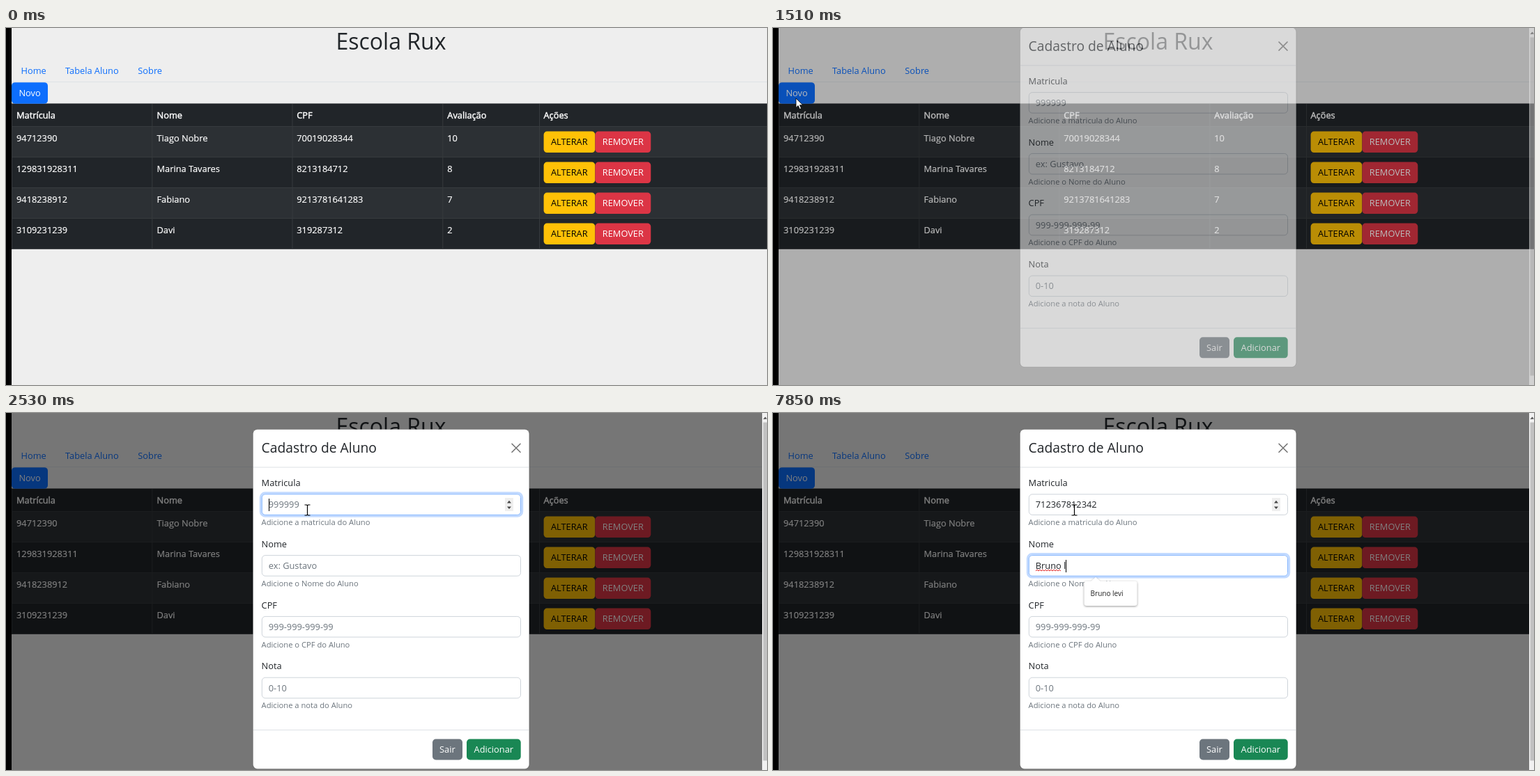
Recreate the animation shown at these times as an HTML page. Size 1092 by 513 pixels, loop 8000 ms.

```html
<!DOCTYPE html>
<html lang="pt">
<head>
<meta charset="utf-8">
<style>
  html, body { margin: 0; width: 100%; height: 100%; overflow: hidden; background: #eee; }
  svg { display: block; width: 1092px; height: 513px; }
  text { font: 12.8px "Open Sans", "Noto Sans", sans-serif; white-space: pre; }
</style>
</head>
<body>
<svg id="stage" viewBox="0 0 1092 513"></svg>
<script>
const LOOP = 8000;
const stage = document.getElementById('stage');
const $ = id => document.getElementById(id);

const text = (x, y, s, fill = '#212529', extra = '') =>
  `<text x="${x}" y="${y}" fill="${fill}" ${extra}>${s}</text>`;
const rect = (x, y, w, h, fill, extra = '') =>
  `<rect x="${x}" y="${y}" width="${w}" height="${h}" fill="${fill}" ${extra}/>`;
const size = px => `style="font-size:${px}px"`;
const whiteText = (x, y, s, weight) => text(x, y, s, '#fff', `stroke="#fff" stroke-width="${weight}"`);

// ---- page ----
const columns = [15, 216.5, 417.3, 633.3, 771.5];
const headings = ['Matrícula', 'Nome', 'CPF', 'Avaliação', 'Ações'];
const students = [
  ['94712390', 'Tiago Nobre', '70019028344', '10'],
  ['129831928311', 'Marina Tavares', '8213184712', '8'],
  ['9418238912', 'Fabiano', '9213781641283', '7'],
  ['3109231239', 'Davi', '319287312', '2'],
];

const buttons = [];
function button(x, y, w, label, fill, hover, color = '#fff') {
  const id = 'button' + buttons.length;
  const h = 30.5;
  buttons.push({ id, x, y, w, h, fill, hover });
  return rect(x, y, w, h, fill, `id="${id}" rx="4.8"`) + text(x + 10.4, y + 19.8, label, color);
}

function page() {
  let s = rect(0, 0, 1092, 513, '#eee')
    + text(552.5, 31, 'Escola Rux', '#212529', `text-anchor="middle" ${size(32)}`)
    + text(21.5, 66.2, 'Home', '#0d6efd') + text(85, 66.2, 'Tabela Aluno', '#0d6efd')
    + text(189.3, 66.2, 'Sobre', '#0d6efd')
    + rect(8, 77, 1084, 1, '#dee2e6')
    + rect(8, 108.5, 1084, 209.3, '#212529');
  students.forEach((row, i) => {
    const y = 141 + i * 44;
    if (i % 2 === 0) s += rect(8, y, 1084, 44, '#2c3034');
    s += rect(8, y, 1084, 1, '#373b3e');
  });
  for (const x of [8, 209.3, 410.5, 626.3, 765]) s += rect(x, 109, 1, 208.5, '#373b3e');
  headings.forEach((h, i) => s += whiteText(columns[i], 130.2, h, 0.45));
  students.forEach((row, i) => {
    const y = 141 + i * 44;
    row.forEach((cell, j) => s += whiteText(columns[j], y + 21.5, cell, 0.2));
    s += button(771.6, y + 7.6, 73.8, 'ALTERAR', '#ffc107', '#ffca2c', '#000')
      + button(845.4, y + 7.6, 79.9, 'REMOVER', '#dc3545', '#bb2d3b');
  });
  return s + button(8, 78.2, 52, 'Novo', '#0d6efd', '#0b5ed7');
}

// ---- dialog ----
const fields = [
  ['Matricula', '999999', 'Adicione a matricula do Aluno'],
  ['Nome', 'ex: Gustavo', 'Adicione o Nome do Aluno'],
  ['CPF', '999-999-999-99', 'Adicione o CPF do Aluno'],
  ['Nota', '0-10', 'Adicione a nota do Aluno'],
];

function field([label, placeholder, help], i) {
  return `<g transform="translate(0 ${i * 87.8})">`
    + text(366.6, 105, label)
    + rect(367, 116.5, 372, 30, 'none', `id="ring${i}" stroke="#0d6efd" stroke-width="0"`)
    + rect(367.3, 116.8, 371.2, 29.6, '#fff', `id="box${i}" rx="4.8" stroke="#ced4da"`)
    + text(376.8, 136.2, placeholder, '#6c757d', `id="value${i}"`)
    + text(366.6, 161, help, '#6c757d', size(11.2)) + '</g>';
}

function dialog() {
  return rect(354.4, 23.4, 396.4, 488, '#fff', 'rx="6.4" stroke="#000" stroke-opacity=".2"')
    + text(366.6, 57, 'Cadastro de Aluno', '#212529', size(19.25))
    + '<path d="M726 44.3l12 12m0-12l-12 12" stroke="#000" stroke-opacity=".55" stroke-width="1.6" stroke-linecap="round"/>'
    + rect(355, 77.5, 395, 1, '#dee2e6') + rect(355, 455, 395, 1, '#dee2e6')
    + fields.map(field).join('')
    + rect(612, 468.5, 43, 30, '#6c757d', 'rx="4.8"') + text(622, 488, 'Sair', '#fff')
    + rect(661, 468.5, 77.7, 30, '#198754', 'rx="4.8"') + text(671.6, 488, 'Adicionar', '#fff')
    + `<g id="spinner">${rect(716, 122, 12, 19, '#efefef')}
       <path d="M719 129.4l3-3.6 3 3.6zM719 134.4l3 3.6 3-3.6z" fill="#444"/></g>`
    + '<path id="squiggle" fill="none" stroke="#e02020" stroke-width="1"/>'
    + rect(377, 123, 1, 18, '#000', 'id="caret"')
    + `<g id="popup"><path d="M450 241.5h6.5l6.5-5.5 6.5 5.5h49.5q3.5 0 3.5 3.5v28.5q0 3.5-3.5 3.5h-69q-3.5 0-3.5-3.5v-28.5q0-3.5 3.5-3.5z"
       fill="#fff" style="filter:drop-shadow(0 1px 1.5px #0006)"/>${text(455.6, 263.3, 'Bruno levi', '#222', size(10))}</g>`;
}

const scrollbar = rect(1085, 0, 7, 513, '#f1f1f1') + rect(1086.5, 13.5, 5.5, 486, '#c1c1c1')
  + '<path d="M1086.5 9l3-3.5 2.5 3z" fill="#505050"/>';

const cursors = `<g id="cursor">
  <circle id="halo" r="10" cy="2" fill="#ffe600" fill-opacity=".45"/>
  <path id="arrow" d="M0 0v13.5l3.1-2.9 2.2 5 2.3-1-2.2-4.8h4.3z" fill="#fff" stroke="#000" stroke-width=".8"/>
  <path id="hand" d="M-1.5 2.2q1.5-2 3 0v5.5l6 1.5q1.5 .5 1.5 2.5l-1 4-1.5 3.5h-6l-2-3.5-4-4.5q0-2 2-1l2 1.5z" fill="#fff" stroke="#000" stroke-width=".9"/>
  <path id="beam" d="M-4 -7.5h3l1 1 1-1h3M0-6.5v13M-4 7.5h3l1-1 1 1h3" fill="none" stroke="#000" stroke-width="1.2"/>
</g>`;

stage.innerHTML = page()
  + rect(0, 0, 1092, 513, '#000', 'id="backdrop"')
  + `<g id="modal"><g id="dialog">${dialog()}</g>${scrollbar}</g>`
  + rect(0, 0, 8, 513, '#000') + cursors;

// ---- timeline ----
const clamp = v => Math.max(0, Math.min(1, v));
const stepped = (t, start) => start + Math.floor((t - start) / 70) * 70;
const within = (t, a, b) => t >= a && t < b;
const show = (id, on) => $(id).setAttribute('visibility', on ? 'visible' : 'hidden');
const set = (id, attrs) => { for (const k in attrs) $(id).setAttribute(k, attrs[k]); };
const latest = (list, t) => list.reduce((found, item) => t >= item[0] ? item : found, list[0])[1];

const mousePath = [
  [260, 900, 500], [460, 885, 305], [680, 560, 215], [1030, 50, 128], [1240, 33, 101],
  [1650, 33, 101], [1850, 418, 67], [2060, 432.5, 139.5], [LOOP, 432.5, 139.5],
];
const digitCount = [[0, 0], [3270, 1], [3340, 3], [3410, 5], [3610, 7], [3680, 9], [3830, 11], [3900, 12]];
const nameTyped = [[0, ''], [5430, 'b'], [5980, ''], [6120, 'B'], [6640, 'Br'], [6770, 'Bru'],
  [6970, 'Brun'], [7390, 'Bruno'], [7590, 'Bruno '], [7850, 'Bruno l']];

function mouseAt(t) {
  const i = Math.max(1, mousePath.findIndex(p => p[0] >= t));
  const [a, b] = [mousePath[i - 1], mousePath[i]];
  const k = clamp((t - a[0]) / (b[0] - a[0]));
  return { x: a[1] + (b[1] - a[1]) * k, y: a[2] + (b[2] - a[2]) * k };
}

function drawMouse(t) {
  const open = t >= 1440;
  const { x, y } = mouseAt(stepped(t, 260));
  let hovering = false;
  for (const b of buttons) {
    const over = !open && t >= 260 && x > b.x && x < b.x + b.w && y > b.y && y < b.y + b.h;
    hovering = hovering || over;
    $(b.id).setAttribute('fill', over ? b.hover : b.fill);
  }
  const beam = t >= 1990;
  set('cursor', { transform: `translate(${x} ${y})` });
  show('arrow', t >= 260 && !hovering && !beam);
  show('hand', hovering);
  show('beam', beam);
  show('halo', within(t, 1310, 1440) || within(t, 2320, 2460));
  show('spinner', beam);
}

function drawFocus(i, amount) {
  const mix = (a, b) => Math.round(a + (b - a) * amount);
  const spread = 3.2 * amount;
  set('box' + i, { stroke: `rgb(${mix(206, 134)},${mix(212, 183)},${mix(218, 254)})` });
  set('ring' + i, {
    x: 367 - spread / 2, y: 116.5 - spread / 2, width: 372 + spread, height: 30 + spread,
    rx: 4.8 + spread / 2, 'stroke-width': spread, 'stroke-opacity': 0.25 * amount,
  });
}

function setValue(i, typed) {
  const node = $('value' + i);
  node.textContent = typed || fields[i][1];
  node.setAttribute('fill', typed ? '#212529' : '#6c757d');
  return typed ? node.getComputedTextLength() : 0;
}

function drawForm(t) {
  const fade = start => t < start ? 0 : clamp((stepped(t, start) - start + 30) / 150);
  const toName = fade(4360);
  drawFocus(0, fade(2320) * (1 - toName));
  drawFocus(1, toName);

  const widths = [
    setValue(0, '712367812342'.slice(0, latest(digitCount, t))),
    setValue(1, latest(nameTyped, t)),
  ];
  const active = t >= 4360 ? 1 : 0;
  set('caret', { x: Math.floor(377 + widths[active]), y: active ? 211 : 123 });
  show('caret', t >= 2390 && !within(t, 2940, 3270) && !within(t, 4900, 5430));
  show('popup', within(t, 5500, 5980) || t >= 6190);

  let wave = 'M377 227';
  for (let x = 379; x <= 413; x += 2) wave += `L${x} ${x % 4 === 3 ? 225.2 : 227}`;
  set('squiggle', { d: wave });
  show('squiggle', t >= 7590);
}

function draw(t) {
  const elapsed = t < 1440 ? 0 : stepped(t, 1440) - 1429;
  const opacity = clamp(elapsed / 150);
  const slide = -40 * Math.pow(1 - clamp(elapsed / 300), 1.6);
  set('backdrop', { opacity: opacity / 2 });
  set('modal', { opacity });
  set('dialog', { transform: `translate(0 ${slide})` });
  drawMouse(t);
  drawForm(t);
}

const begin = performance.now();
function tick() {
  draw((performance.now() - begin) % LOOP);
  requestAnimationFrame(tick);
}
tick();
</script>
</body>
</html>
```
